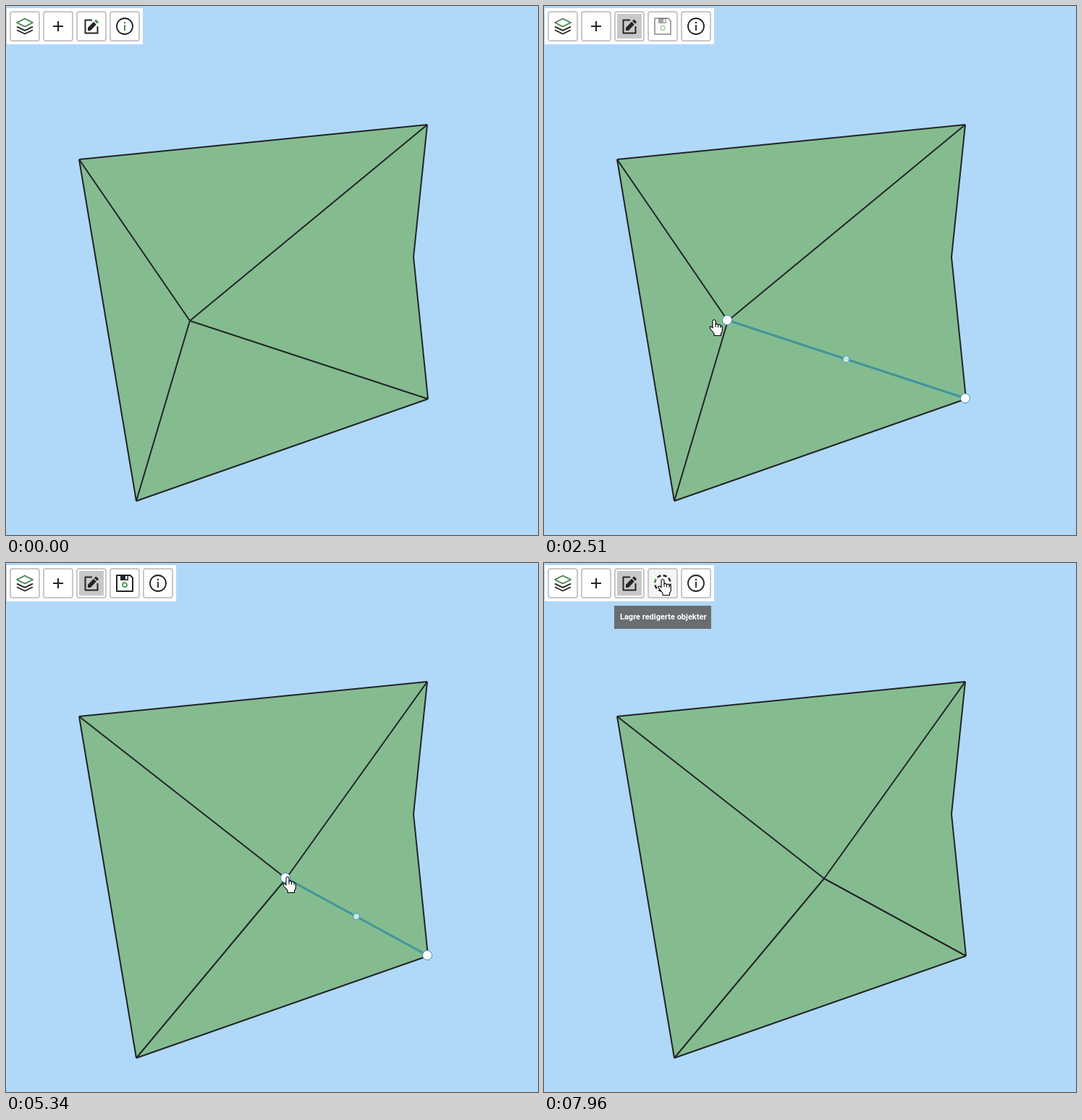
Recreate the animation shown at these times as an HTML page with a canvas. Size 735x731 px, loop 8 s.

```html
<!DOCTYPE html>
<html lang="no">
<head>
<meta charset="utf-8">
<style>
html, body { margin: 0; height: 100%; overflow: hidden; background: #b0d8f9; }
canvas { display: block; }
</style>
</head>
<body>
<canvas id="stage" width="735" height="731"></canvas>
<script>
const ctx = document.getElementById('stage').getContext('2d');
const DARK = '#222426', GREEN = '#3f7d48', TAU = Math.PI * 2;

// When things happen, in ms
const T = {
  enter: 260, pressEdit: 960, edit: 1090, tipEdit: 1150, leaveEdit: 1290,
  hover: 1840, pressLine: 2110, select: 2240, grab: 3130, drop: 4410,
  snap: 5340, overSave: 6220, tipSave: 6490, pressSave: 6620, save: 6750
};

// Cursor track: time, x, y
const track = [
  [260, 704, 720], [460, 640, 515], [650, 520, 305], [780, 310, 135], [900, 127, 34],
  [1225, 127, 34], [1290, 150, 66], [1490, 285, 295], [1630, 300, 420], [1840, 301, 452],
  [1910, 302, 450], [2240, 302, 450], [2510, 235, 434], [2580, 235, 434], [2780, 255, 434],
  [3130, 255, 433], [3270, 280, 456], [3400, 304, 459], [3610, 372, 447], [3735, 372, 447],
  [3870, 375, 427], [4080, 388, 434], [4400, 388, 434], [4410, 389, 434], [5735, 389, 434],
  [5930, 365, 360], [6060, 320, 262], [6220, 169, 38], [6290, 164, 23], [8001, 164, 23]
];
const STEP = 67; // the pointer moves at about 15 frames per second

const A = [101, 212], B = [582, 164], C = [563, 347], D = [583, 543], E = [180, 684];
const area = new Path2D('M101 212L582 164L563 347L583 543L180 684Z');
const pointer = new Path2D('M-2 1Q0-2 2 1V6Q4 4 5.5 6.7Q8 5.2 9 8Q11.5 7.4 11.3 10V15' +
  'Q11 17 9.5 18.5V21.5H0V18.5L-5 12.5Q-7 9.5-5 9Q-3.5 9-2 11Z');
const pointerLines = new Path2D('M2 6V10M5.5 7V10.5M9 8V11');
const fist = new Path2D('M-5-3Q-4-6.5-1.8-5Q0-7 2-5Q4-6 5-3.5Q7-3 6.5 0Q6.5 3 4.5 5V7H-4V5' +
  'L-6.5 1Q-7-1.5-5-1.5Z');
const fistLines = new Path2D('M-5-3V0M-1.8-5V-2M2-5V-2M5-3.5V-1.5');
const openHand = new Path2D('M-4-5Q-4-8-1.8-7Q0-9.5 2-7Q4.5-8 5-4.5Q7.5-5 7 0Q7 3 4.8 5V8H-3.5V5' +
  'L-7.5-.5Q-7-3-4 0Z');
const openLines = new Path2D('M-1.8-7V-1M2-7V-1M5-4.5V-1');

function cursorAt(t) {
  const i = track.findIndex(k => k[0] > t);
  const [t0, x0, y0] = track[i - 1], [t1, x1, y1] = track[i];
  const f = Math.floor((t - t0) / STEP) * STEP / (t1 - t0);
  return [x0 + (x1 - x0) * f, y0 + (y1 - y0) * f];
}

const within = (t, a, b) => t >= a && t < b;

function stroke(path, color, width) {
  ctx.strokeStyle = color;
  ctx.lineWidth = width;
  ctx.stroke(path);
}

function fill(path, color) {
  ctx.fillStyle = color;
  ctx.fill(path);
}

function line(a, b, color = DARK, width = 2) {
  stroke(new Path2D(`M${a}L${b}`), color, width);
}

function disc(x, y, r) {
  const p = new Path2D();
  p.arc(x, y, r, 0, TAU);
  return p;
}

function at(x, y, draw) {
  ctx.save();
  ctx.translate(x, y);
  draw();
  ctx.restore();
}

function handle([x, y], r, color) {
  const p = disc(x, y, r);
  fill(p, color);
  stroke(p, '#3a8bc9', 1);
}

// Icons are drawn around their own centre
function layersIcon() {
  stroke(new Path2D('M-11 5.2L0 10.5L11 5.2M-11 .6L0 5.9L11 .6'), DARK, 1.8);
  stroke(new Path2D('M0-10.5L11-5L0 .5L-11-5Z'), GREEN, 1.6);
}

function plusIcon() {
  stroke(new Path2D('M-7 0H7M0-7V7'), DARK, 2);
}

function editIcon(lit) {
  stroke(new Path2D('M1-8.5H-8.5V9.5H8.5V0'), DARK, 2);
  fill(new Path2D('M-5 6V2L3-6.2L6.8-2.4L-1.2 6Z'), DARK);
  fill(new Path2D('M4-7.2L6.3-9.6L10.2-5.8L7.9-3.5Z'), lit ? '#3f9a4e' : DARK);
}

function saveIcon(on) {
  ctx.globalAlpha = on ? 1 : .42;
  stroke(new Path2D('M-11-11H7.5L11-7.5V11H-11Z'), DARK, 2);
  const slot = new Path2D('M-6-11H5V-4H-6ZM1-10V-5.5H3.5V-10Z');
  ctx.fillStyle = DARK;
  ctx.fill(slot, 'evenodd');
  stroke(disc(0, 2.2, 3), '#2f8a3c', 1.6);
}

function infoIcon(lit) {
  const color = lit ? GREEN : DARK;
  stroke(disc(0, 0, 11), DARK, 1.8);
  stroke(new Path2D('M0-2V6'), color, 1.8);
  fill(disc(0, -5, 1.2), color);
}

function spinner(t) {
  const turn = Math.PI + .3 + (t - 7960) / 2000 * TAU;
  for (let i = 0; i < 8; i++) {
    const a = turn + i * TAU / 8, p = new Path2D();
    p.arc(0, 0, 10.8, a - .25, a + .25);
    stroke(p, i ? DARK : '#2f8a2f', 2.4);
  }
}

function button(x, icon, bg = '#fff', inset) {
  at(x, 28, () => {
    const box = new Path2D();
    box.roundRect(-20, -20, 40, 40, 3);
    fill(box, bg);
    stroke(box, '#c8c8c8', 2);
    if (inset) {
      ctx.fillStyle = '#c8c8c8';
      ctx.fillRect(-17, -17, 34, 34);
    }
    icon();
  });
}

function toolbar(t) {
  const editing = t >= T.edit;
  ctx.fillStyle = '#fcfdfe';
  ctx.fillRect(1, 3, editing ? 234 : 188, 50);
  button(26, layersIcon);
  button(72, plusIcon);
  button(118, () => editIcon(t < 900), '#fff', editing);
  if (editing) {
    button(164, () => t >= T.save ? spinner(t) : saveIcon(t >= T.snap),
      t >= T.overSave ? '#f5f5f5' : '#fff');
  }
  button(editing ? 210 : 164, () => infoIcon(!editing));
}

function tooltip(text, x, width) {
  ctx.fillStyle = '#6a6d6f';
  ctx.fillRect(x, 59, width, 32);
  ctx.fillStyle = '#fff';
  ctx.font = '700 11px Roboto, sans-serif';
  ctx.fillText(text, x + 8, 78);
}

function shape(t, cursor) {
  const hub = t < T.snap ? [254, 435] : [387, 436];
  fill(area, '#84bc90');
  [[A, B], [B, C], [C, D], [D, E], [E, A], [A, hub], [B, hub], [E, hub]]
    .forEach(([a, b]) => line(a, b));
  if (!within(t, T.hover, T.save)) return line(hub, D);

  const end = [582, 542];
  const free = t < T.grab ? [253, 434] : t < T.drop ? [cursor[0] - 2, cursor[1] + 1] : [386, 435];
  line(free, end, '#41949a', 3);
  if (t < T.select) return;
  handle(free, 6.5, '#fff');
  handle([(free[0] + end[0]) / 2, (free[1] + end[1]) / 2], 4.5, 'rgba(255,255,255,.7)');
  handle(end, 6.5, '#fff');
}

function drawCursor(t, [x, y]) {
  const dragging = within(t, T.grab, T.drop);
  const pressed = dragging || within(t, T.pressEdit, T.edit) ||
    within(t, T.pressLine, T.select) || within(t, T.pressSave, T.save);
  const onBar = y < 53 && x < 235;
  const [body, lines] = dragging ? [fist, fistLines]
    : onBar || ctx.isPointInPath(area, x, y) ? [pointer, pointerLines] : [openHand, openLines];
  at(Math.round(x), Math.round(y), () => {
    fill(body, '#fff');
    stroke(body, '#000', 1.1);
    stroke(lines, '#000', 1);
    if (pressed) fill(disc(0, 0, 12), 'rgba(255,255,0,.5)');
  });
}

function frame() {
  const t = performance.now() % 8000;
  const cursor = t < T.enter ? null : cursorAt(t);
  ctx.fillStyle = '#b0d8f9';
  ctx.fillRect(0, 0, 735, 731);
  ctx.lineJoin = 'round';
  shape(t, cursor);
  toolbar(t);
  if (within(t, T.tipEdit, T.leaveEdit + 70)) tooltip('Rediger objekt', 74, 87);
  if (t >= T.tipSave) tooltip('Lagre redigerte objekter', 97, 134);
  if (cursor) drawCursor(t, cursor);
  requestAnimationFrame(frame);
}
frame();
</script>
</body>
</html>
```
